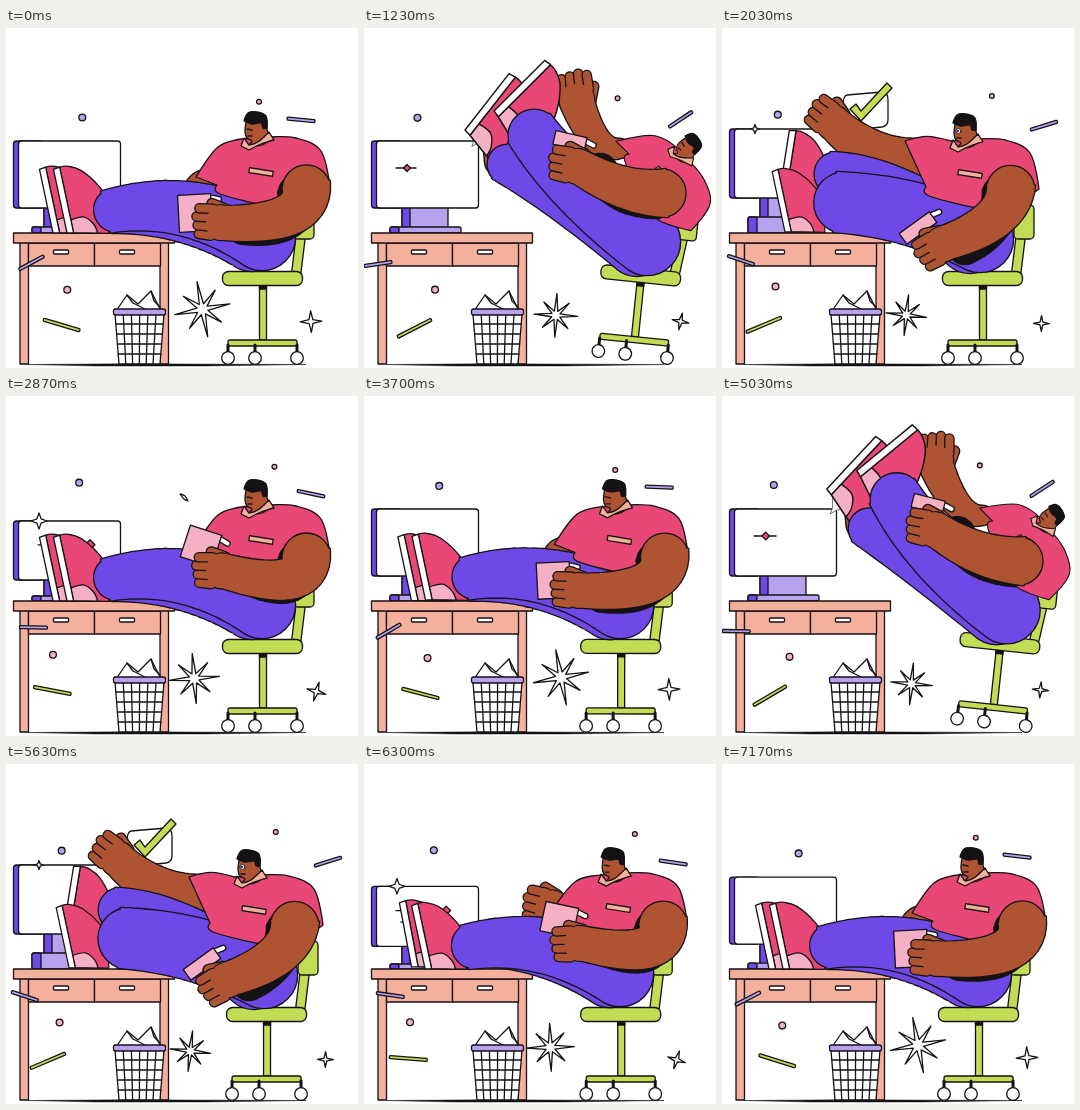
Recreate the animation shown at these times as an HTML page with a canvas. Size 352 by 340 pixels, loop 7.21 s.

```html
<!DOCTYPE html>
<html lang="en">
<head>
<meta charset="utf-8">
<title>Coffee break</title>
<style>
html, body { margin: 0; width: 100%; height: 100%; overflow: hidden; background: #fff; }
canvas { display: block; }
</style>
</head>
<body>
<canvas id="stage" width="352" height="340"></canvas>
<script>
const ctx = document.getElementById('stage').getContext('2d');
const PERIOD = 3605, RAD = Math.PI / 180;
const INK = '#141214', PINK = '#e94876', VIOLET = '#6f48e8', LILAC = '#b7a2ee', PEACH = '#f4b09c',
  ROSE = '#f5b0c6', GREEN = '#c3dc55', SKIN = '#ae5433', WHITE = '#fff';

// ---- keyed motion: smooth cyclic interpolation without overshoot ----
function track(keys) {
  const times = Object.keys(keys).map(Number), vals = Object.values(keys), n = times.length;
  const at = i => times[(i + n) % n] + PERIOD * Math.floor(i / n);
  const val = (i, j) => vals[(i + n) % n][j];
  const slope = (i, j) => (val(i + 1, j) - val(i, j)) / (at(i + 1) - at(i));
  const tangent = (i, j) => {
    const a = slope(i - 1, j), b = slope(i, j);
    return a * b > 0 ? 2 * a * b / (a + b) : 0;
  };
  return t => {
    let i = n - 1;
    while (times[i] > t) i--;
    const h = at(i + 1) - at(i), u = (t - at(i)) / h, w = 1 - u;
    return vals[i].map((a, j) => a * w * w * (1 + 2 * u) + val(i + 1, j) * u * u * (3 - 2 * u)
      + h * u * w * (w * tangent(i, j) - u * tangent(i + 1, j)));
  };
}

// rest, legs up, leaning back (drifting on a little), reaching forward, settling
const poses = (rest, up, lean, reach, settle = rest, extra) => track({
  0: rest, 765: up, 1230: lean, 1520: lean.map((v, i) => v + (v - up[i]) * .12),
  2030: reach, 2870: settle, ...extra });

// the figure's rig: joints and angles
const body = poses([252, 115, 0, 1], [275, 113, 18, 1], [316, 130, 50, .87], [245, 117, 0, 1]);
const look = poses([0, 0, 0], [5, 0, 0], [45, 0, -10], [0, 1, 38]);           // head angle, open eye, sleeve lift
const hip = poses([256, 209], [268, 212], [283, 214], [258, 211]);
const nearShoe = poses([61, 205, -12, 1], [84, 164, -8, 1.05], [130, 83, 45, 1.1], [63, 204, -12, .95]);
const farShoe = poses([47, 205, -12, 1], [65, 188, -10, 1.07], [101, 102, 38, 1.1], [57, 168, 9, 1.02]);
// ankle, ankle radius, knee pull
const nearLeg = poses([100, 184, 21, 180, 165], [117, 145, 21, 200, 148], [165, 100, 25, 205, 158], [113, 174, 30, 190, 178]);
const farLeg = poses([104, 188, 17, 180, 180], [102, 177, 16, 180, 148], [136, 133, 19, 195, 160], [107, 145, 21, 165, 150]);
// shoulder, elbow pull, wrist, hand angle
const nearArm = poses([300, 156, 306, 198, 218, 195, 6], [308, 162, 318, 202, 222, 184, 0],
  [303, 165, 262, 167, 216, 139, 12], [289, 157, 288, 194, 223, 215, -28], [300, 156, 306, 200, 218, 175, 4]);
// elbow pull, wrist, hand angle
const farArm = poses([188, 158, 200, 172, 0], [196, 142, 207, 162, 0], [232, 128, 213, 74, 85], [150, 132, 114, 97, 40], undefined, {
  1580: [236, 118, 209, 34, 90], 2290: [150, 120, 136, 45, 75] });
// centre, angle, size
const cup = poses([189, 185, -3, 33, 37], [204, 159, 2, 33, 15], [206, 113, 13, 32, 14], [196, 200, -36, 37, 13],
  [195, 150, 18, 33, 33]);

// the furniture and the screen
const chair = poses([0, 0], [5, 2.5], [12, 5.8], [4, 0]);
const screen = poses([113, 180], [113, 180], [113, 180], [101, 170], [125, 184]);
const sparkle = poses([0], [9], [0], [4.5], [8]);
const chart = poses([0, 0, 43, 0], [0, 25, 34, 0], [20, 0, 43, 3.5], [0, 0, 60, 0], [56, 23, 84, 5]);
const bubble = track({ 0: [0, 0], 480: [0, 0], 765: [1, 0], 1230: [.45, 0], 1700: [.45, 2], 2030: [1, 8], 2420: [0, 8] });
const glint = track({ 0: [0], 2680: [0], 2870: [1], 3040: [0] });

// ---- drawing helpers ----
function paint(fill, width = 1.3) {
  if (fill) { ctx.fillStyle = fill; ctx.fill(); }
  if (width) { ctx.lineWidth = width; ctx.strokeStyle = INK; ctx.stroke(); }
}
function poly(p, fill, width) {
  ctx.beginPath();
  for (let i = 0; i < p.length; i += 2) ctx.lineTo(p[i], p[i + 1]);
  ctx.closePath();
  paint(fill, width);
}
function box(x, y, w, h, fill, r = 0) {
  ctx.beginPath();
  ctx.roundRect(x, y, w, h, r);
  paint(fill);
}
function oval(x, y, rx, ry, fill, width) {
  ctx.beginPath();
  ctx.ellipse(x, y, rx, ry, 0, 0, 7);
  paint(fill, width);
}
const dot = (x, y, r, fill, width) => oval(x, y, r, r, fill, width);
function line(p, color = INK, width = 1.3) {
  ctx.beginPath();
  for (let i = 0; i < p.length; i += 2) ctx.lineTo(p[i], p[i + 1]);
  ctx.strokeStyle = color;
  ctx.lineWidth = width;
  ctx.stroke();
}
function rod(p, color, width) {
  line(p, INK, width + 2.6);
  line(p, color, width);
}
// closed curve through the points, sharp at the listed indices
function blob(p, fill, corners = []) {
  const n = p.length / 2, pt = i => [p[(i + n) % n * 2], p[(i + n) % n * 2 + 1]];
  const tan = i => {
    if (corners.includes(i % n)) return [0, 0];
    const [a, b] = pt(i - 1), [c, d] = pt(i + 1);
    return [(c - a) * .17, (d - b) * .17];
  };
  ctx.beginPath();
  ctx.moveTo(p[0], p[1]);
  for (let i = 0; i < n; i++) {
    const [x, y] = pt(i), [u, v] = pt(i + 1), [a, b] = tan(i), [c, d] = tan(i + 1);
    ctx.bezierCurveTo(x + a, y + b, u - c, v - d, u, v);
  }
  ctx.closePath();
  paint(fill);
}
function star(x, y, radius, tips, inner, deg, fill = WHITE) {
  if (radius < .4) return;
  const p = [];
  for (let i = 0; i < tips * 2; i++) {
    const a = i * Math.PI / tips + (deg - 90) * RAD;
    const r = radius * (i % 2 ? inner : tips > 4 && i % 4 ? .82 : 1);
    p.push(x + r * Math.cos(a), y + r * Math.sin(a));
  }
  poly(p, fill);
}
function placed(x, y, deg, s, draw) {
  if (s < .02) return;
  ctx.save();
  ctx.translate(x, y);
  ctx.rotate(deg * RAD);
  ctx.scale(s, s);
  draw();
  ctx.restore();
}
// a local point carried into the stage by a placement
function carry([x, y, deg, s], u, v) {
  const c = Math.cos(deg * RAD) * s, d = Math.sin(deg * RAD) * s;
  return [x + u * c - v * d, y + u * d + v * c];
}
// bent tapering tube: flat at the start, round at the end
function limb(x0, y0, cx, cy, x1, y1, r0, r1) {
  const path = new Path2D(), steps = 16;
  const at = u => {
    const w = 1 - u, dx = w * (cx - x0) + u * (x1 - cx), dy = w * (cy - y0) + u * (y1 - cy);
    const k = (r0 + (r1 - r0) * u) / Math.hypot(dx, dy);
    return [w * w * x0 + 2 * u * w * cx + u * u * x1, w * w * y0 + 2 * u * w * cy + u * u * y1, -dy * k, dx * k];
  };
  for (let i = 1; i <= steps; i++) {
    const [ax, ay, an, am] = at((i - 1) / steps), [bx, by, bn, bm] = at(i / steps);
    path.moveTo(ax - an, ay - am);
    path.lineTo(bx - bn, by - bm);
    path.lineTo(bx + bn, by + bm);
    path.lineTo(ax + an, ay + am);
    path.closePath();
    const r = Math.hypot(bn, bm);
    path.moveTo(bx + r, by);
    path.arc(bx, by, r, 0, 2 * Math.PI);
  }
  return path;
}
// the outline goes under whatever joins the limb, the fill over it
function drawLimb(path, fill, joined) {
  ctx.strokeStyle = INK;
  ctx.lineWidth = 2.6;
  ctx.stroke(path);
  if (joined) joined();
  ctx.fillStyle = fill;
  ctx.fill(path);
}

// ---- scene parts ----
function drawMonitor(t) {
  const [top, bottom] = screen(t), foot = Math.max(5, 186 - bottom);
  box(38, bottom - 2, 46, 204 - bottom, LILAC);
  box(38, bottom - 2, 8, 204 - bottom, VIOLET);
  box(26, 205 - foot, 71, foot, LILAC, 2);
  box(26, 205 - foot, 9, foot, VIOLET, 2);
  box(7.5, top, 30, bottom - top, VIOLET, 3);
  box(12.5, top, 102, bottom - top, WHITE, 3);
  const k = (bottom - top) / 67, [upper, lower, x, r] = chart(t);
  const y1 = top + 27 * k, y2 = top + 40 * k;
  if (upper > 1) line([32, y1, 32 + upper, y1]);
  if (lower > 1) line([37, y2, 37 + lower, y2]);
  star(x, y1, r, 4, .7, 0, PINK);
  star(33, top, sparkle(t)[0], 4, .38, 0);
}

function drawDesk() {
  for (const x of [14, 154]) box(x, 214, 8.5, 122, PEACH);
  for (const x of [22.5, 88.5]) {
    box(x, 215, 66, 23, PEACH);
    box(x + 25, 222, 15, 4, WHITE, 1);
  }
  box(7.5, 205, 161, 10, PEACH);
}

function drawBin() {
  poly([110, 283, 121, 267, 132, 276, 145, 263, 155, 283], WHITE);
  line([121, 267, 127, 275, 139, 281]);
  line([145, 263, 148, 273, 154, 279]);
  poly([109, 286, 158, 286, 154, 336, 113, 336], WHITE);
  for (let i = 1; i < 6; i++) line([109 + i * 8.2, 286, 113 + i * 6.8, 336]);
  for (let i = 1; i < 5; i++) line([109 + i * .8, 286 + i * 10, 158 - i * .8, 286 + i * 10]);
  box(107.5, 281, 52, 6, LILAC, 2);
}

function drawChair(t) {
  const [dx, deg] = chair(t);
  placed(291 + dx, 330, deg, 1, () => {
    ctx.translate(-291, -330);
    rod([290, 247, 295, 206], GREEN, 8);
    box(288, 177, 20, 34, GREEN, 4);
    box(253.5, 256, 7, 56, GREEN);
    box(253.5, 256, 7, 5, INK);
    box(222, 312, 69, 6, GREEN, 2);
    for (const x of [222, 249, 291]) {
      line([x, 317, x, 325], INK, 3);
      dot(x, 330, 6.3, WHITE);
    }
    box(216.5, 243.5, 80, 14, GREEN, 6);
  });
}

function drawBubble(t) {
  const [s, shift] = bubble(t);
  placed(108 + shift, 118 - shift, 0, s, () => {
    ctx.beginPath();
    ctx.moveTo(0, 0);
    ctx.lineTo(5, -14);
    ctx.quadraticCurveTo(3, -42, 9, -43);
    ctx.lineTo(44, -46);
    ctx.quadraticCurveTo(50, -46, 50, -38);
    ctx.lineTo(50, -18);
    ctx.quadraticCurveTo(50, -12, 44, -11);
    ctx.lineTo(15, -8);
    ctx.closePath();
    paint(WHITE);
    poly([12, -29, 18, -34, 23, -27, 49, -55, 54, -50, 23, -17], GREEN);
  });
}

function drawLeg(shoe, [x, y, r, kx, ky], hx, hy, hr) {
  rod([...carry(shoe, 26, -15), x, y], SKIN, 30);
  placed(...shoe, () => {
    blob([6.5, -66, 15, -65, 27, -58, 41, -39, 45, -24, 41, 9, 6.5, 1], PINK, [0, 5, 6]);
    blob([6.5, -12, 20, -12, 28, -3, 30, 6.5, 6.5, 1], ROSE, [0, 3, 4]);
    poly([0, -65, 6.5, -66, 6.5, 1, 0, 0], WHITE);
  });
  drawLimb(limb(x, y, kx, ky, hx, hy, r, hr), VIOLET);
}

// points left: thumb on top, four stacked fingers
function drawHand(x, y, deg, s) {
  placed(x, y, deg, s, () => {
    rod([0, -14, -14, -18], SKIN, 9);
    oval(-3, 0, 15, 18, SKIN);
    for (let i = 3; i >= 0; i--) rod([-12, -13 + 9 * i, -28 + 2 * Math.abs(i - 1), -12 + 8.5 * i], SKIN, 8);
    oval(-5, 0, 13, 17, SKIN, 0);
  });
}

function drawArm(path, x, y, deg, s) {
  drawLimb(path, SKIN, () => drawHand(x, y, deg, s));
}

function drawHead(eye) {
  blob([-12, -21, -13, -11, -11, -5, -6, -2, -9, 3, 4, 2, 11, -5, 9, -14, 9, -22], SKIN, [0, 8]);
  blob([-14, -22, -10, -30, -1, -31, 8, -27, 9, -15, 5, -15, 3, -20, -6, -19], INK, [0, 4]);
  blob([-14, -5, -17, 3, -9, 7, 3, 1, 16, -3, 11, -11, 0, -1, -9, 2], PEACH, [0, 1, 2, 4, 5, 7]);
  line([-11, -14, -6, -13]);
  line([-10, -7, -6, -7]);
  if (eye > .1) {
    dot(-8.5, -14, 2.4 * eye, WHITE, .8);
    dot(-9, -14, eye, INK, 0);
  }
}

function drawPerson(t) {
  const place = body(t), [nod, eye, lift] = look(t), [hx, hy] = hip(t);
  const [ex, ey, fx, fy, fdeg] = farArm(t), [sx, sy, kx, ky, wx, wy, wdeg] = nearArm(t);

  const [ax, ay] = carry(place, -62, 34 - lift), [bx, by] = carry(place, -41, 42);
  const cuff = Math.hypot(ax - bx, ay - by) / 2;
  drawArm(limb((ax + bx) / 2, (ay + by) / 2, ex, ey, fx, fy, cuff, 17), fx, fy, fdeg, 1);

  drawLeg(farShoe(t), farLeg(t), hx - 10, hy + 3, 31);
  drawLeg(nearShoe(t), nearLeg(t), hx, hy, 33);

  placed(...place, () => {
    blob([-16, -4, -40, 4 - lift / 3, -62, 34 - lift, -41, 42, -38, 51, 10, 63, 38, 65, 72, 44, 63, 8, 38, -5, 10, -6],
      PINK, [0, 2, 3, 7, 10]);
    placed(3, 29, 9, 1, () => box(-12, -2.5, 24, 5, PEACH));
  });
  const [x, y, , s] = place;
  placed(x, y, nod, s, () => drawHead(eye));

  drawLimb(limb(sx - 8, sy + 5, kx - 8, ky + 5, wx + 20, wy + 4, 20, 17), INK);
  const [cx, cy, cdeg, w, h] = cup(t);
  placed(cx, cy, cdeg, 1, () => {
    rod([w / 2, 4 - h / 2, w / 2 + 8, 6 - h / 2], WHITE, 4);
    box(-w / 2, -h / 2, w, h, ROSE);
  });
  drawArm(limb(sx, sy, kx, ky, wx, wy, 24, 17), wx, wy, wdeg, 1);
}

function drawConfetti(t) {
  const wave = (mid, amp, shift) => mid + amp * Math.cos((t / PERIOD * 360 - shift) * RAD);
  const stick = (x, y, deg, len, fill) => placed(x, y, deg, 1, () => box(-len / 2, -1.5, len, 3, fill, 1));
  dot(wave(64.5, 13, -25), wave(88.5, 2.5, 65), 3.4, LILAC);
  dot(wave(259.5, -13, 60), wave(71, 3, 20), 2.4, ROSE);
  dot(wave(60, 14, 85), wave(260.5, 2.5, 60), 3.4, ROSE);
  stick(wave(309, -14, 0), wave(94, 5, 245), wave(-10, 24, 310), 28, LILAC);
  stick(wave(21, -7, 130), wave(234, 3, 75), wave(-7, 26, 215), 28, LILAC);
  stick(wave(49.5, 8, 40), wave(297.5, 3, 100), wave(-6, 25, 335), 38, GREEN);
  star(wave(191, 7, 40), wave(284.5, -3.5, -20), wave(24, 4, 0), 8, .2, wave(-2, -9, 0));
  star(wave(312.5, -7.5, 0), wave(294.3, 1.7, 245), wave(9.3, 1.5, 0), 4, .25,
    8 - 10 * Math.cos(t / PERIOD * 4 * Math.PI));
  placed(178, 101, 0, glint(t)[0], () => blob([-4, -3, 1, -1, 4, 4, 0, 2], WHITE, [0, 2]));
}

function frame() {
  const t = performance.now() % PERIOD;
  ctx.fillStyle = WHITE;
  ctx.fillRect(0, 0, 352, 340);
  ctx.lineCap = ctx.lineJoin = 'round';
  poly([22, 336.5, 120, 335.8, 300, 336.5, 200, 338, 90, 338], INK, .5);
  drawMonitor(t);
  drawDesk();
  drawBin();
  drawBubble(t);
  drawChair(t);
  drawPerson(t);
  drawConfetti(t);
  requestAnimationFrame(frame);
}
frame();
</script>
</body>
</html>
```
